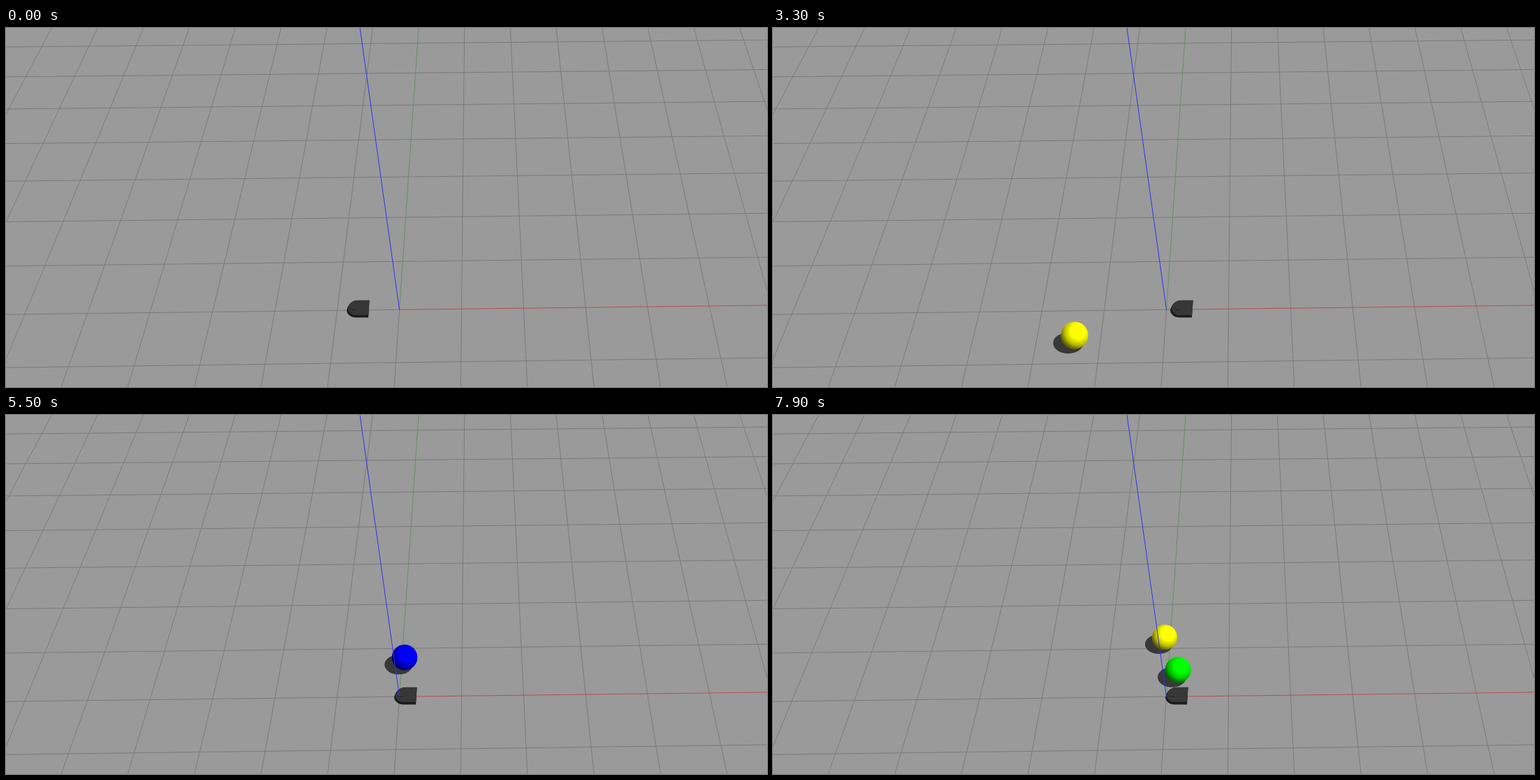
Animation, 1090 px wide and 514 px high, one loop 8 s. Source, as an HTML page with a canvas:

```html
<!DOCTYPE html>
<html>
<head>
<meta charset="utf-8">
<style>
  html, body { margin: 0; width: 100%; height: 100%; overflow: hidden; background: #9a9a9a; }
  canvas { display: block; }
</style>
</head>
<body>
<canvas id="stage" width="1090" height="514"></canvas>
<script>
const ctx = document.getElementById('stage').getContext('2d');
const W = 1090, H = 514, LOOP = 8000, STEP = 100;
const ORIGIN = { x: 563.5, y: 403.3 }, SPAWN = 5.1;
const GRID = '#7b7b7b', SHADOW = '#383838';

// Ground plane: u runs along the red axis, v along the green one.
const rowY = v => (ORIGIN.y - 53.45 * v) / (1 + 0.04645 * v);
const colX = (u, y) => 556 + 95.4 * u + (35 - 29.7 * u) * (H - y) / H;
const mix = (a, b, f) => a + (b - a) * f;

// The simulation stalls once, then catches up with a jump.
const simTime = t => t < 2400 ? t : t < 2900 ? 2400 : t - 130;

// Balls roll straight from the far line to the red axis; a missed one rolls past it.
const balls = [
  { color: '#ffff00', start: 667, travel: 2281, from: -.078, to: -1.298, missed: true },
  { color: '#00ff00', start: 400, travel: 2373, from: -.116, to: -1.113, missed: true },
  { color: '#ff8205', start: 3270, travel: 1765, from: 1.37, to: .484 },
  { color: '#0000ff', start: 3870, travel: 1783, from: -.731, to: .188 },
  { color: '#00ff00', start: 5758, travel: 2253, from: -.743, to: .269 },
  { color: '#ffff00', start: 6358, travel: 1870, from: 1.039, to: -.468 }
];

// Turning points of the robot: [time, left edge]
const robotPath = [[400, 488], [2000, 514], [2400, 539], [3170, 569], [4370, 566.5],
  [4970, 582], [5370, 556], [6770, 545], [7770, 562]];

function robotX(time) {
  const i = Math.max(1, robotPath.findIndex(([at]) => at >= time));
  const [t0, x0] = robotPath[i - 1], [t1, x1] = robotPath[i];
  return mix(x0, x1, Math.max(0, (time - t0) / (t1 - t0)));
}

function placeBall({ color, start, travel, from, to, missed }, time) {
  const p = (time - start) / travel;
  if (p < 0 || p > (missed ? 1.1 : .98)) return [];
  const y = rowY(SPAWN * (1 - p));
  return [{ color, x: colX(mix(from, to, p), y), y, r: 13.7 + .0133 * y }];
}

function line(color, x1, y1, x2, y2) {
  ctx.strokeStyle = color;
  ctx.lineWidth = 1;
  ctx.beginPath();
  ctx.moveTo(x1, y1);
  ctx.lineTo(x2, y2);
  ctx.stroke();
}

function drawGround() {
  ctx.fillStyle = '#9a9a9a';
  ctx.fillRect(0, 0, W, H);
  for (let v = -1; v <= 7; v++) {
    const y = rowY(v), slope = (10 + (y - 22) * .0088) / W;
    const end = v ? W : ORIGIN.x;
    line(GRID, 0, y + 560 * slope, end, y + (560 - end) * slope);
  }
  for (let u = -8; u <= 7; u++) {
    const top = u ? 0 : ORIGIN.y;
    line(GRID, colX(u, top), top, colX(u, H), H);
  }
  line('#639063', colX(0, 0), 0, ORIGIN.x, ORIGIN.y);
  line('#b85050', ORIGIN.x, ORIGIN.y, W, 397);
}

function disc(x, y, rx, ry, fill) {
  ctx.fillStyle = fill;
  ctx.beginPath();
  ctx.ellipse(x, y, rx, ry, 0, 0, 2 * Math.PI);
  ctx.fill();
}

function drawBall({ color, x, y, r }) {
  const cx = x + .28 * r, cy = y - .3 * r;
  const shade = ctx.createRadialGradient(cx, cy, 0, cx, cy, 1.41 * r);
  shade.addColorStop(.4, 'rgba(0,0,0,0)');
  shade.addColorStop(.7, 'rgba(0,0,0,.25)');
  shade.addColorStop(1, 'rgba(0,0,0,.7)');
  disc(x, y, r, r, color);
  disc(x, y, r, r, shade);
}

function hull(x, y, w, h, fill) {
  ctx.fillStyle = fill;
  ctx.beginPath();
  ctx.moveTo(x + w, y);
  ctx.lineTo(x + w - 1.5, y + h);
  ctx.lineTo(x + w * .4, y + h);
  ctx.bezierCurveTo(x + w * .18, y + h, x, y + h * .8, x, y + h * .56);
  ctx.bezierCurveTo(x + w * .08, y + h * .2, x + w * .25, y, x + w * .46, y);
  ctx.fill();
}

function drawRobot(x) {
  hull(x, 390, 32.5, 24.5, '#1c1c1c');
  hull(x + 2, 389.7, 30.7, 21.3, '#373737');
  ctx.strokeStyle = '#262626';
  ctx.beginPath();
  ctx.moveTo(x + 4, 402);
  ctx.quadraticCurveTo(x + 8, 405, x + 14, 403);
  ctx.stroke();
}

function draw(t) {
  const time = simTime(t);
  const visible = balls.flatMap(b => placeBall(b, time)).sort((a, b) => a.y - b.y);
  drawGround();
  for (const { x, y, r } of visible) disc(x - .47 * r, y + .57 * r, 1.1 * r, .77 * r, SHADOW);
  visible.filter(b => b.y < ORIGIN.y).forEach(drawBall);
  drawRobot(robotX(time));
  visible.filter(b => b.y >= ORIGIN.y).forEach(drawBall);
  line('#3030f0', ORIGIN.x, ORIGIN.y, 507, 0);
}

function tick() {
  draw(Math.floor(performance.now() % LOOP / STEP) * STEP);
  requestAnimationFrame(tick);
}
tick();
</script>
</body>
</html>
```
